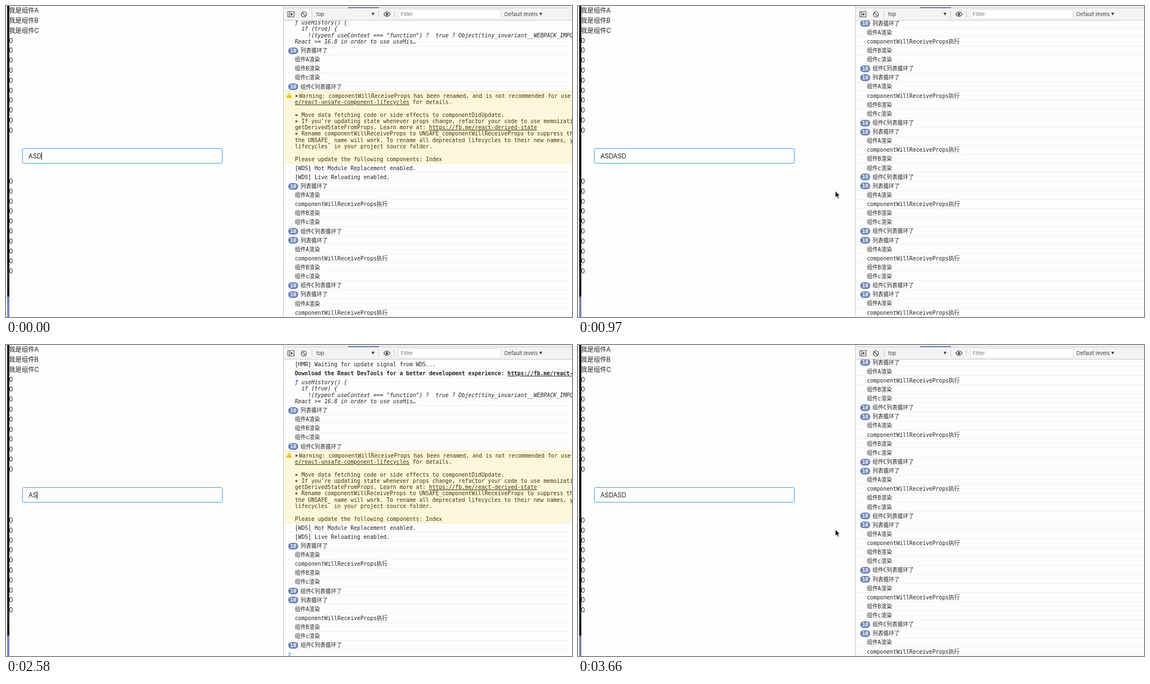
Write an HTML page that moves like this. It is 1009 by 555 pixels and loops after 3760 ms.

```html
<!DOCTYPE html>
<html lang="zh">
<meta charset="utf-8">
<style>
html, body { margin: 0; width: 100%; height: 100%; overflow: hidden; background: #fdfdfd; }
body { position: relative; font: 11.3px/17.76px Inter, "Noto Sans CJK SC", "Noto Sans CJK", sans-serif; color: #222; }
body > * { position: absolute; }
#edge { left: 2px; top: 0; width: 3.5px; height: 555px;
  background: linear-gradient(#151a15 0 60px, #10130f 460px, #26302a 475px, #141a20 517px, #7684bd 520px 100%); }
.list { left: 5.3px; white-space: pre; }
#field { left: 29px; top: 254px; width: 345px; height: 25px; padding-left: 10px; border: 1px solid #5aaaf4;
  border-radius: 3px; box-shadow: 0 0 0 1px #1890ff30; line-height: 26px; white-space: pre; }
#caret { display: inline-block; width: 1px; height: 14px; background: #111; vertical-align: -3px; }
#panel { left: 494px; top: 0; width: 514px; height: 555px; border-left: 1px solid #c6c6c6; overflow: hidden; }
#log { position: absolute; left: 0; width: 514px;
  font: 9.7px/11.28px "DejaVu Sans Mono", "Noto Sans CJK SC", "Noto Sans CJK", monospace; color: #222; }
.row { position: relative; box-sizing: border-box; padding: 2.4px 0 0 20px; white-space: pre; box-shadow: inset 0 -1px #f1f1f1; }
.row.many { padding-left: 30px; }
.row.many::before { content: "10"; position: absolute; left: 8px; top: 2px; width: 18px; height: 12px; border-radius: 6px;
  background: #6f86b6; color: #fff; font: bold 9.3px/12px "DejaVu Sans Mono", monospace; text-align: center; }
.warn { background: #fcf7db; color: #453200; box-shadow: inset 0 -1px #f5ebbb, inset 0 1px #f5ebbb; }
.warn span { margin-left: 7.5px; }
.row svg { position: absolute; left: 0; top: 0; }
.row i b { color: #1a2c9c; font-weight: normal; }
#bar { position: absolute; left: 0; top: 0; font: 9.3px Inter, sans-serif; }
#mouse { left: 0; top: 0; }
</style>
<body>
<div id="edge"></div>
<div class="list" id="upper" style="top:.4px"></div>
<div class="list" id="lower" style="top:305.2px"></div>
<div id="field"><span id="typed"></span><span id="caret"></span></div>
<div id="panel">
  <div id="log"></div>
  <svg id="bar" width="514" height="26" viewBox="495 0 514 26" fill="#444">
    <path fill="#f3f3f3" d="M495 0h514v26H495z"/>
    <path fill="#ccc" d="M495 3h514v1H495zM495 25h514v1H495zM545 8h1v13h-1zM664 8h1v13h-1zM692 8h1v13h-1z"/>
    <path fill="#5d7fbd" d="M610 2h55v2h-55z"/>
    <path fill="none" stroke="#555" stroke-width="1.1" d="M502.5 10h11v9.5h-11zM505.5 10v9.5"/>
    <path d="M507.5 12l4.2 2.8-4.2 2.8z"/>
    <g fill="none" stroke="#555" stroke-width="1.3">
      <circle cx="531" cy="15" r="4.6"/><path d="M527.8 11.8l6.4 6.4"/>
      <path d="M673.5 14.7q5.5-8 11.5 0q-6 8-11.5 0z"/>
    </g>
    <circle cx="679.2" cy="14.7" r="2.2"/>
    <path d="M651.5 12h5.6l-2.8 5zM950.5 12h5.6l-2.8 5z"/>
    <rect x="700" y="6.5" width="182" height="16.5" fill="#fff" stroke="#e2e2e2"/>
    <text x="553" y="17.5">top</text>
    <text x="703.5" y="18" fill="#777">Filter</text>
    <text x="888.5" y="17.5">Default levels</text>
  </svg>
</div>
<svg id="mouse" width="12" height="18">
  <path d="M.8.8v11.4l2.6-2.4 1.8 4.2 2-.9-1.8-4h3.4z" fill="#000" stroke="#fff" stroke-width=".8"/>
</svg>
<script>
const $ = id => document.getElementById(id);
const LINE = 11.28, ROW = 16.13, ROUND = 6 * ROW, TOP = 26.5, LOOP = 3760;

$('upper').textContent = [...'ABC'].map(c => '我是组件' + c).concat(Array(10).fill('0')).join('\n');
$('lower').textContent = Array(10).fill('0').join('\n');

function addRow(html, cls = '') {
  const row = document.createElement('div');
  const lines = html.split('\n').length;
  row.className = 'row ' + cls;
  row.style.height = lines * LINE + ROW - LINE + 'px';
  row.innerHTML = html;
  $('log').append(row);
  return row;
}

function addRound(updating) {
  return [
    addRow('列表循环了', 'many'),
    addRow('组件A渲染'),
    ...(updating ? [addRow('componentWillReceiveProps执行')] : []),
    addRow('组件B渲染'),
    addRow('组件c渲染'),
    addRow('组件C列表循环了', 'many')
  ];
}

const warnIcon = '<svg width="30" height="14">' +
  '<path d="M9.7 3.2l4.3 8.2H5.4z" fill="#f0b400" stroke="#f0b400" stroke-linejoin="round"/>' +
  '<path d="M9.2 5.3h1v3.4h-1zM9.2 9.6h1v1h-1z" fill="#fff"/>' +
  '<path d="M21.5 6l3.8 2.5-3.8 2.5z" fill="#453200"/></svg>';

addRow('[HMR] Waiting for update signal from WDS...');
addRow('<b>Download the React DevTools for a better development experience: <u>https://fb.me/react-devtools</u></b>');
addRow(`<i><b>ƒ</b> useHistory() {
  if (true) {
    !(typeof useContext === "function") ?  true ? Object(tiny_invariant__WEBPACK_IMPORTED
React &gt;= 16.8 in order to use useHis…</i>`);
addRound(false);
addRow(`${warnIcon}<span>Warning: componentWillReceiveProps has been renamed, and is not recommended for use</span>
<u>e/react-unsafe-component-lifecycles</u> for details.

<b>∗</b> Move data fetching code or side effects to componentDidUpdate.
<b>∗</b> If you're updating state whenever props change, refactor your code to use memoization
getDerivedStateFromProps. Learn more at: <u>https://fb.me/react-derived-state</u>
<b>∗</b> Rename componentWillReceiveProps to UNSAFE_componentWillReceiveProps to suppress this
the UNSAFE_ name will work. To rename all deprecated lifecycles to their new names, you
lifecycles\` in your project source folder.

Please update the following components: Index`, 'warn');
addRow('[WDS] Hot Module Replacement enabled.');
addRow('[WDS] Live Reloading enabled.');
const rounds = Array.from({ length: 6 }, () => addRound(true));
addRow('<svg width="20" height="16"><path d="M8.8 4.8l3 2.9-3 2.9" fill="none" stroke="#4680e8" stroke-width="1.3"/></svg>');

// time, keys typed, caret shown, pointer position
const steps = [
  [0, 3, 1], [120, 4, 1],
  [270, 6, 1, 193, 275.5], [390, 6, 1, 300, 297], [540, 6, 1, 400, 317],
  [690, 6, 0, 458, 328.5], [840, 6, 0, 458, 329.5],
  [1280, 6, 1], [1850, 6, 0],
  [2150, 0, 1], [2430, 1, 1], [2580, 2, 1], [2850, 3, 1], [3110, 4, 1],
  [3230, 6, 1, 193, 275.5], [3380, 6, 1, 300, 297], [3510, 6, 1, 400, 317],
  [3660, 6, 0, 458, 328.5]
];
let shown;

function show([, keys, caret, x, y]) {
  $('typed').textContent = 'ASDASD'.slice(0, keys);
  $('caret').style.visibility = caret ? '' : 'hidden';
  rounds.forEach((rows, i) => rows.forEach(r => r.hidden = i >= keys));
  // The log sticks to its end once it outgrows the panel.
  const scroll = Math.max(0, 37 + (keys - 3) * ROUND);
  $('log').style.top = TOP - scroll + 'px';
  $('mouse').style.display = x ? '' : 'none';
  if (x) $('mouse').style.transform = `translate(${x}px, ${y}px)`;
}

function frame() {
  const t = performance.now() % LOOP;
  const step = steps.filter(s => s[0] <= t).pop();
  if (step !== shown) show(shown = step);
  requestAnimationFrame(frame);
}
frame();
</script>
</body>
</html>
```
